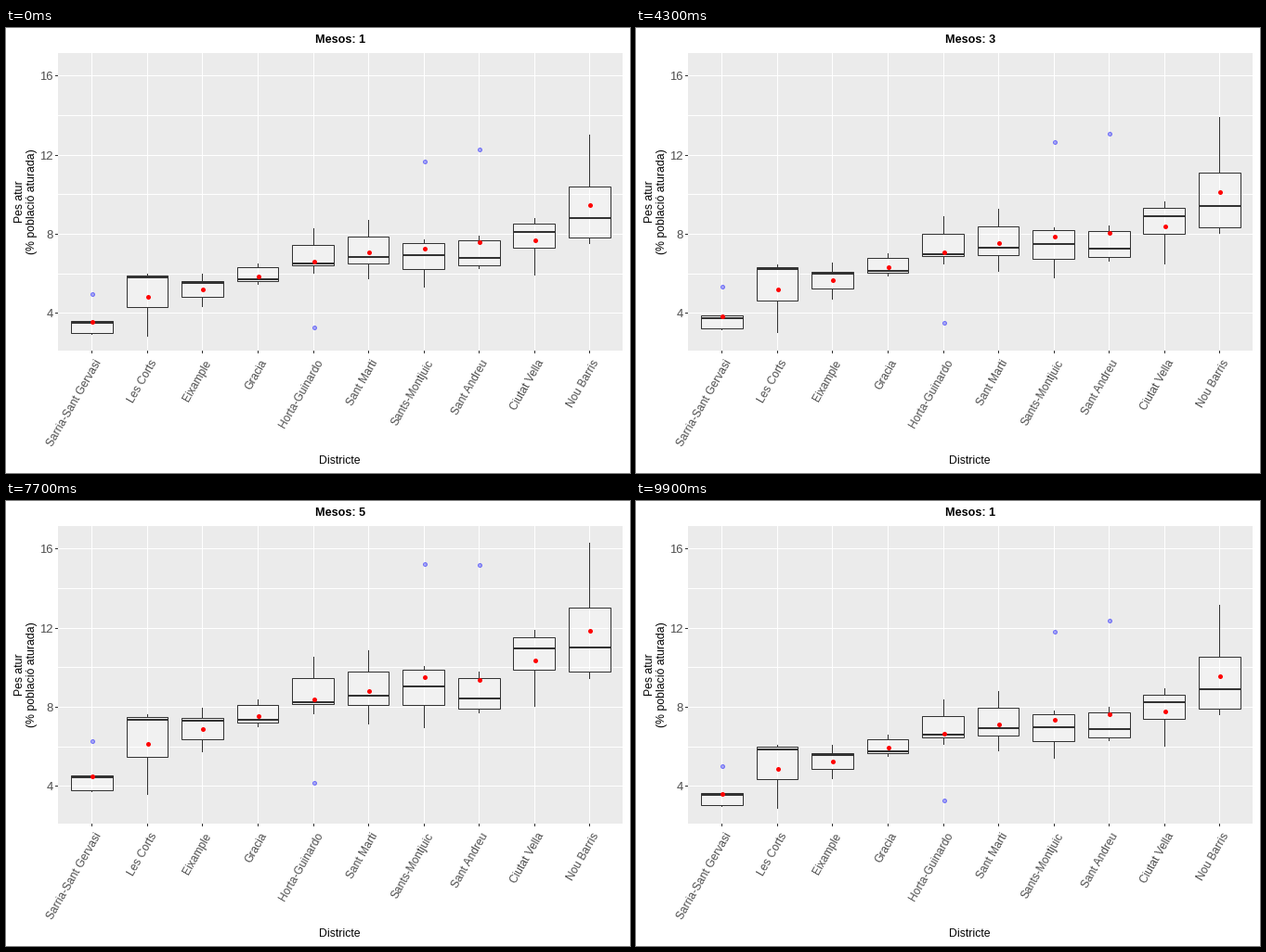
A matplotlib script that plays this animation: 672x480 px, repeating every 10 s.

```python
import numpy as np
import matplotlib.pyplot as plt
from matplotlib.animation import FuncAnimation
from matplotlib.collections import LineCollection, PolyCollection
from matplotlib.patches import Rectangle

W, H, DPI = 672, 480, 96
PX = 72 / DPI                      # one pixel in points
FRAMES, INTERVAL = 100, 100
STARTS = [9, 26, 43, 60, 77, 93]   # first frame of each transition
STEPS = 8
LEFT, TOP, RIGHT, BOTTOM = 56, 27, 664, 348
MAJOR, MINOR = [4, 8, 12, 16], [6, 10, 14]
INK, GREY = "#333333", "#4D4D4D"

# Name, growth over the six months, then the first month:
# low whisker, lower quartile, median, upper quartile, high whisker, mean[, outlier]
DISTRICTS = [
    ("Sarria-Sant Gervasi", 1.29, 2.9, 3.0, 3.5, 3.6, 3.6, 3.6, 5.0),
    ("Les Corts", 1.295, 2.8, 4.3, 5.8, 5.9, 6.0, 4.87),
    ("Eixample", 1.355, 4.3, 4.8, 5.5, 5.6, 6.0, 5.23),
    ("Gracia", 1.315, 5.4, 5.6, 5.7, 6.3, 6.5, 5.9),
    ("Horta-Guinardo", 1.295, 6.0, 6.4, 6.5, 7.45, 8.3, 6.63, 3.3),
    ("Sant Marti", 1.27, 5.7, 6.5, 6.85, 7.85, 8.7, 7.1),
    ("Sants-Montjuic", 1.335, 5.3, 6.2, 6.9, 7.55, 7.7, 7.3, 11.7),
    ("Sant Andreu", 1.26, 6.2, 6.4, 6.8, 7.65, 7.9, 7.6, 12.3),
    ("Ciutat Vella", 1.385, 5.9, 7.3, 8.1, 8.5, 8.8, 7.7),
    ("Nou Barris", 1.275, 7.5, 7.8, 8.8, 10.4, 13.0, 9.5),
]
RISE = [0, 0.04, 0.23, 0.70, 0.91, 1]   # share of the growth reached per month

GROWTH = np.array([d[1] for d in DISTRICTS]) - 1
BASE = np.array([d[2:8] for d in DISTRICTS])
OUT_AT = [i for i, d in enumerate(DISTRICTS) if len(d) > 8]
OUT_BASE = np.array([DISTRICTS[i][8] for i in OUT_AT])


def mid(p):
    """Centre of the pixel that holds p."""
    return np.floor(p) + 0.5


def to_y(v):
    return 307.85 - 21.35 * (np.asarray(v) - 4)


STEP = 59.56
XC = 92.8 + STEP * np.arange(len(DISTRICTS))
X, XL, XR = mid(XC), mid(XC - 0.375 * STEP), mid(XC + 0.375 * STEP)

plt.rcParams["font.family"] = "Liberation Sans"
fig = plt.figure(figsize=(W / DPI, H / DPI), dpi=DPI, facecolor="white")
ax = fig.add_axes([0, 0, 1, 1])
ax.set(xlim=(0, W), ylim=(H, 0))
ax.axis("off")


def lines(segs, color, width, z):
    art = LineCollection(segs, colors=color, linewidths=width * PX,
                         capstyle="butt", zorder=z, snap=False)
    return ax.add_collection(art, autolim=False)


def dots(x, size, z, **kw):
    return ax.scatter(x, x, s=(size * PX) ** 2, zorder=z, **kw)


def label(x, y, s, size, **kw):
    kw = {"ha": "center", "va": "baseline", "color": "black", **kw}
    return ax.text(x, y, s, fontsize=size * PX, rotation_mode="anchor", **kw)


def across(v, x0, x1):
    y = mid(to_y(v))
    return [(x0, y), (x1, y)]


def spans(x, y0, y1):
    """Vertical segments at each x."""
    return [[(a, b), (a, c)] for a, b, c in zip(x, y0, y1)]


# Panel, grid and axes
ax.add_patch(Rectangle((LEFT, TOP), RIGHT - LEFT, BOTTOM - TOP,
                       fc="#EBEBEB", ec="none", zorder=0))
ten = np.ones(len(X))
lines([across(v, LEFT, RIGHT) for v in MAJOR + MINOR]
      + spans(X, TOP * ten, BOTTOM * ten), "white", 1, 1)
lines([across(v, LEFT - 3, LEFT) for v in MAJOR]
      + spans(X, BOTTOM * ten, (BOTTOM + 3) * ten), INK, 1, 1)

for v in MAJOR:
    label(50.5, mid(to_y(v)) + 4.5, str(v), 13, ha="right", color=GREY)
for x, (name, *_) in zip(X, DISTRICTS):
    label(x + 10, 360.5, name, 12, ha="right", rotation=60, color=GREY)
label(359.5, 470, "Districte", 12.2)
label(18.5, 187.5, "Pes atur", 12.2, rotation=90)
label(31.5, 187.5, "(% població aturada)", 12.3, rotation=90)
title = label(360, 16, "", 12.6, weight="bold")

# Moving parts
outliers = dots(X[OUT_AT], 4, 2, linewidths=PX, facecolors=[(0, 0, 1, 0.3)],
                edgecolors=[(0, 0, 1, 0.45)])
whiskers = lines([], INK, 1, 3)
boxes = ax.add_collection(
    PolyCollection([], facecolors=(1, 1, 1, 0.33), edgecolors=INK, snap=False,
                   linewidths=PX, joinstyle="miter", zorder=4), autolim=False)
medians = lines([], INK, 2, 5)
means = dots(X, 5, 6, c="red", linewidths=0)


def state_at(frame):
    """Previous month, next month and step of the transition."""
    done = sum(s <= frame for s in STARTS)
    if done == 0:
        return 0, 0, STEPS
    step = min(frame - STARTS[done - 1] + 1, STEPS)
    return done - 1, done % len(RISE), step


def draw(frame):
    a, b, step = state_at(frame)
    ease = (1 - np.cos(np.pi * step / STEPS)) / 2
    scale = 1 + GROWTH * (RISE[a] + (RISE[b] - RISE[a]) * ease)

    lo, q1, med, q3, hi, mean = to_y(BASE * scale[:, None]).T
    q1, q3, med = mid(q1), mid(q3), np.floor(med)
    out = to_y(OUT_BASE * scale[OUT_AT])

    title.set_text(f"Mesos: {(b if step > STEPS // 2 else a) + 1}")
    whiskers.set_segments(spans(X, q1, np.floor(lo)) + spans(X, q3, np.floor(hi)))
    boxes.set_verts([[(l, top), (r, top), (r, low), (l, low)]
                     for l, r, top, low in zip(XL, XR, q3, q1)])
    medians.set_segments([[(l, y), (r, y)] for l, r, y in zip(XL, XR, med)])
    means.set_offsets(np.column_stack([X, mid(mean)]))
    outliers.set_offsets(np.column_stack([X[OUT_AT], mid(out)]))
    return title, whiskers, boxes, medians, means, outliers


anim = FuncAnimation(fig, draw, frames=FRAMES, interval=INTERVAL,
                     repeat=True, repeat_delay=0, blit=False)
plt.show()
```
